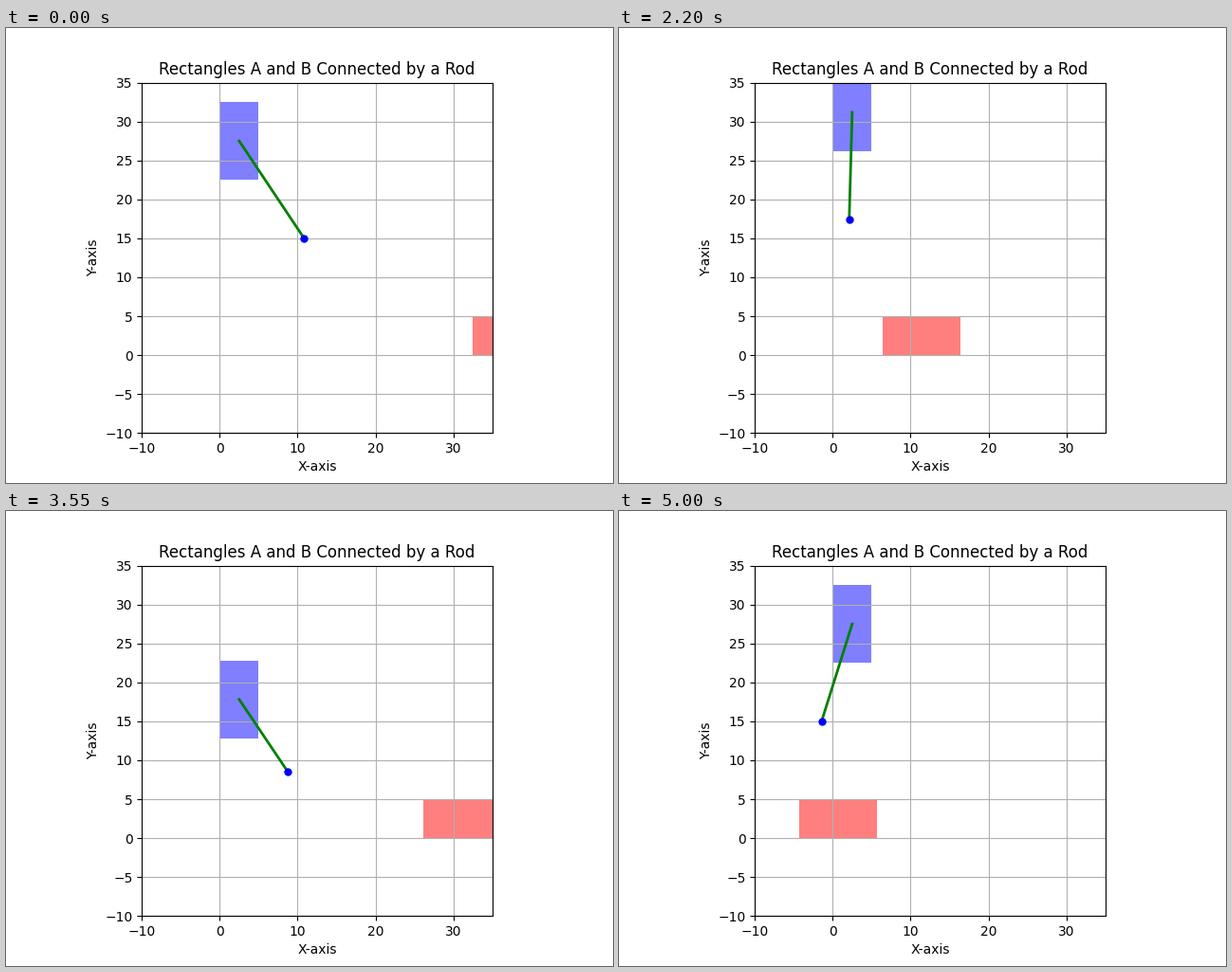
Animation, 640 px wide and 480 px high, one loop 5050 ms. Source, as a matplotlib script:

```python
import numpy as np
import matplotlib.pyplot as plt
from matplotlib.animation import FuncAnimation
from matplotlib.patches import Rectangle

FRAMES = 101
INTERVAL = 50  # ms
A_SIZE = (5, 10)
B_SIZE = (10, 5)

fig, ax = plt.subplots(figsize=(6.4, 4.8), dpi=100)
ax.set_xlim(-10, 35)
ax.set_ylim(-10, 35)
ax.set_aspect("equal")
ax.grid(True)
ax.set_title("Rectangles A and B Connected by a Rod")
ax.set_xlabel("X-axis")
ax.set_ylabel("Y-axis")

rect_a = ax.add_patch(Rectangle((0, 0), *A_SIZE, fc="blue", ec="none", alpha=0.5))
rect_b = ax.add_patch(Rectangle((0, 0), *B_SIZE, fc="red", ec="none", alpha=0.5))
rod, = ax.plot([], [], "g-", lw=2)
joint, = ax.plot([], [], "bo", ms=5)


def corners(frame):
    """Lower-left corners of A (sliding vertically) and B (horizontally)."""
    a = np.array([0, 22.5 + 10 * np.sin(2 * np.pi * frame / 100)])
    b = np.array([12.5 + 20 * np.cos(0.1 * frame), 0])
    return a, b


def update(frame):
    a, b = corners(frame)
    rect_a.set_xy(a)
    rect_b.set_xy(b)
    # The joint divides the line between the corners one third of the way.
    tip = (2 * a + b) / 3
    center = a + np.array(A_SIZE) / 2
    rod.set_data([center[0], tip[0]], [center[1], tip[1]])
    joint.set_data([tip[0]], [tip[1]])
    return rect_a, rect_b, rod, joint


anim = FuncAnimation(fig, update, frames=FRAMES, init_func=lambda: update(0),
                     interval=INTERVAL, repeat=True, repeat_delay=0)
plt.show()
```
